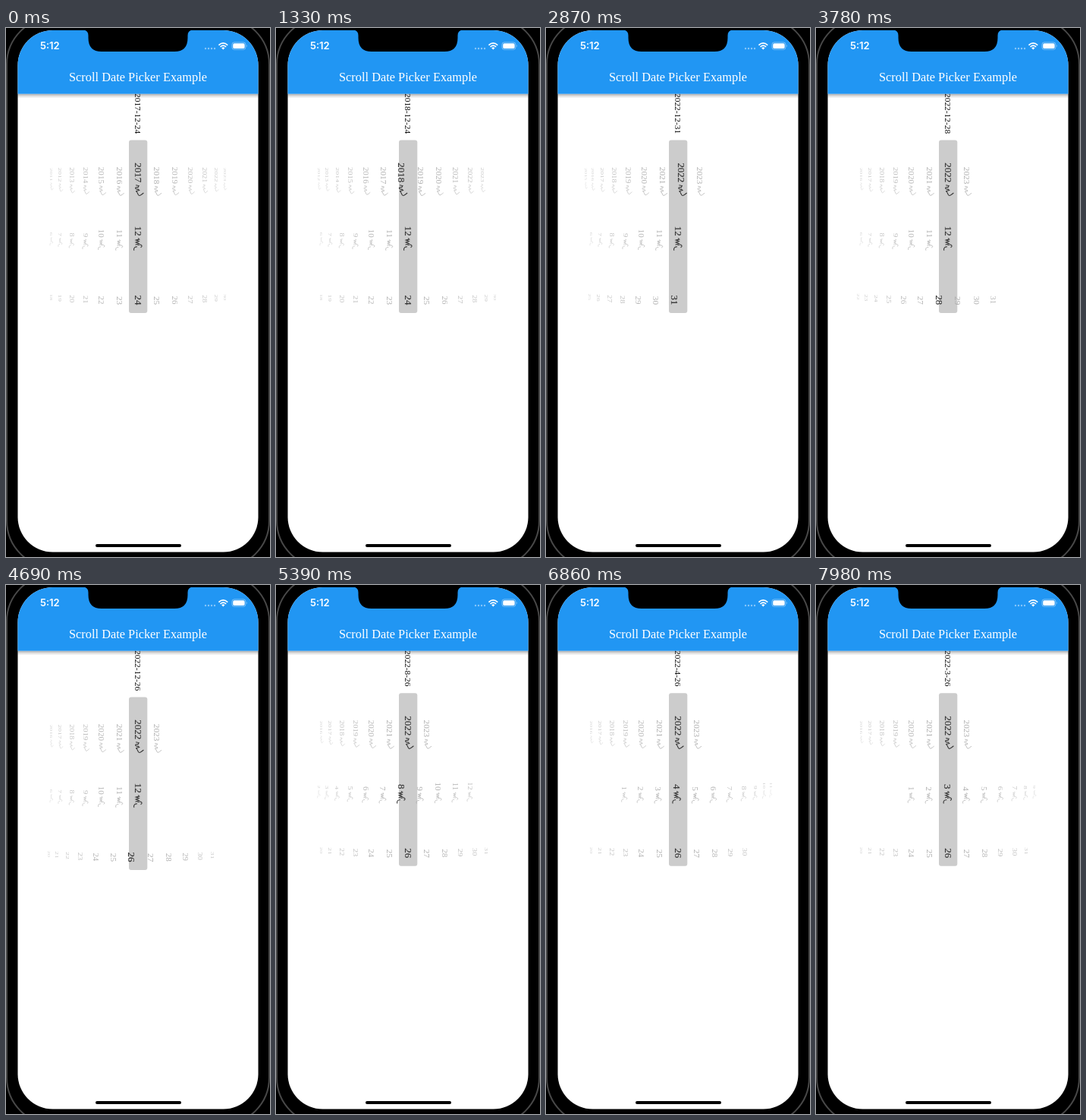
An HTML page for the animation above (8000 ms loop, 348x696 px).

```html
<!DOCTYPE html>
<html lang="en">
<head>
<meta charset="utf-8">
<title>Scroll Date Picker</title>
<style>
  html, body { margin: 0; width: 100%; height: 100%; overflow: hidden; background: #000; }
  svg { display: block; width: 348px; height: 696px; }
  .serif { font-family: "Liberation Serif", "Times New Roman", serif; }
</style>
</head>
<body>
<svg viewBox="0 0 348 696">
  <defs>
    <linearGradient id="shade" x2="0" y2="1">
      <stop offset="0" stop-color="#000" stop-opacity=".32"/>
      <stop offset=".5" stop-color="#000" stop-opacity=".12"/>
      <stop offset="1" stop-color="#000" stop-opacity="0"/>
    </linearGradient>
    <clipPath id="screen"><rect x="15.5" y="3" width="317" height="686.5" rx="46"/></clipPath>
  </defs>
  <rect width="348" height="696" fill="#000"/>
  <rect x="1" y="-14" width="346" height="724" rx="62" fill="none" stroke="#484848" stroke-width="2"/>
  <g clip-path="url(#screen)">
    <rect x="15" y="3" width="318" height="687" fill="#fff"/>
    <text id="date" class="serif" transform="translate(170.2 86)rotate(90)" font-size="11.4" fill="#111"/>
    <g id="picker" class="serif" font-size="11.4"></g>
    <rect x="15" y="86.700" width="318" height="6" fill="url(#shade)"/>
    <rect x="15" y="3" width="318" height="83.700" fill="#2196f3"/>
  </g>
  <path d="M102 2.500Q108.500 3 108.500 10V13Q108.500 31 126 31H222Q239.500 31 239.500 13V10Q239.500 3 246 2.500Z" fill="#000"/>
  <text class="serif" x="174" y="69.500" font-size="16.35" text-anchor="middle" fill="#fff">Scroll Date Picker Example</text>
  <text x="45" y="28.300" font-size="13" font-weight="600" fill="#fff" font-family="Inter, sans-serif">5:12</text>
  <g fill="#fff">
    <g opacity=".45">
      <circle cx="263" cy="27" r="1.200"/><circle cx="267" cy="27" r="1.200"/>
      <circle cx="271" cy="27" r="1.200"/><circle cx="275" cy="27" r="1.200"/>
    </g>
    <path d="M286.300 28.500L284.100 26.200Q286.300 24.400 288.500 26.200Z"/>
    <path d="M280.400 22.600Q286.300 17.200 292.200 22.600M282.500 24.800Q286.300 21.300 290.100 24.800" fill="none" stroke="#fff" stroke-width="1.700"/>
    <rect x="297.900" y="18.900" width="18" height="9.400" rx="2.900" fill="none" stroke="#fff" stroke-opacity=".45" stroke-width=".9"/>
    <rect x="299.200" y="20.200" width="15.400" height="6.800" rx="1.700"/>
    <path d="M317 22Q318.500 23.600 317 25.200Z" opacity=".5"/>
  </g>
  <rect x="118" y="679" width="113" height="4" rx="2" fill="#000"/>
</svg>
<script>
const LOOP = 8000, STEP = 70;
const CENTER = 174, EXTENT = 24.4, VIEW = 317;
const RADIUS = 1.5 * VIEW;
const ITEM_ANGLE = EXTENT / VIEW * 2 * Math.asin(1 / 3);
const DEPTH = 5.85;

// Mongolian words for "year" and "month", placed above the text end
const YEAR_WORD = 'M-2.500-12.500L1-11.800 0-10C-4-10.500-4-7.500 0-7.800L1.500-6.500-2.500-5.500C0-5-.5-.5 1.500-.4 3-.4 5-2.500 6.500-3.500';
const MONTH_WORD = 'M0-15L1.500-13.800-2.500-12.800 1-11.500-2.500-10.300 1-9-3-7.500M-.5-7C4-9 6-5.500 3-4.500M-1-5C-4-5.500-5.500-3-4.500-.8';

// keys: [ms, wheel position]
const columns = {
  year: { mid: 187, end: 221, gap: 15.5, word: YEAR_WORD, keys: [
    [1050, 2017], [1120, 2017.25], [1330, 2018.33], [1890, 2020.3], [2240, 2021.3],
    [2520, 2021.62], [2870, 2021.83], [3220, 2022]] },
  month: { mid: 263, end: 293.7, gap: 17.6, word: MONTH_WORD, keys: [
    [4900, 12], [5250, 9.3], [5670, 6.7], [6090, 4.8], [6370, 4.45], [6720, 4.13], [7140, 4],
    [7700, 4], [7770, 3.8], [7840, 3.5], [7910, 3.2], [7980, 3.02]] },
  day: { mid: 338, end: 364.4, gap: 0, word: '', keys: [
    [2310, 24], [2450, 25.6], [2730, 29.3], [2870, 31.2], [2940, 31.3], [3220, 31],
    [3570, 29.25], [4060, 27.6], [4410, 26.7], [4690, 26.33], [4970, 26]] }
};

// Monotone cubic interpolation
function sample(keys, t) {
  const last = keys.length - 1;
  if (t <= keys[0][0]) return keys[0][1];
  if (t >= keys[last][0]) return keys[last][1];
  const slope = i => (keys[i + 1][1] - keys[i][1]) / (keys[i + 1][0] - keys[i][0]);
  const tangent = i => {
    if (i === 0 || i === last) return 0;
    const a = slope(i - 1), b = slope(i);
    return a * b > 0 ? 2 * a * b / (a + b) : 0;
  };
  const i = keys.findIndex(k => k[0] > t) - 1;
  const [t0, v0] = keys[i], [t1, v1] = keys[i + 1];
  const h = t1 - t0, u = (t - t0) / h, r = 1 - u;
  return v0 * (1 + 2 * u) * r * r + h * tangent(i) * u * r * r
       + v1 * u * u * (3 - 2 * u) - h * tangent(i + 1) * u * u * r;
}

function item(col, value, k, selected, shift) {
  const angle = k * ITEM_ANGLE, sin = Math.sin(angle), cos = Math.cos(angle);
  const w = 1 + DEPTH * (1 - cos);
  const x = CENTER + RADIUS * sin / w;
  const y = col.mid + (col.end - col.mid) / w + shift;
  const zoom = selected ? 1.14 : 1;
  const sx = zoom * (cos / w - DEPTH * sin * sin / (w * w));
  const color = selected ? '#333' : '#a8a8a8';
  const fade = selected ? 1 : 1 - 0.08 * Math.abs(k);
  return `<g transform="matrix(${sx} 0 0 ${zoom / w} ${x} ${y})" fill="${color}" stroke="${color}" opacity="${fade}">
    <text transform="translate(-3.8 ${-col.gap})rotate(90)" text-anchor="end" stroke-width="${selected ? 0.12 : 0}">${value}</text>
    <path d="${col.word}" fill="none" stroke-width="${selected ? 0.95 : 0.8}"/></g>`;
}

function wheel(col, pos, picked, max, shift) {
  let out = '';
  for (let v = Math.max(1, Math.ceil(pos - 6.98)); v <= max && v - pos < 6.98; v++)
    out += item(col, v, v - pos, v === picked, shift);
  return out;
}

const picker = document.getElementById('picker');
const dateText = document.getElementById('date');

function draw(t) {
  const pos = {}, date = {};
  for (const name in columns) {
    pos[name] = sample(columns[name].keys, t);
    date[name] = Math.round(pos[name]);
  }
  const max = { year: 2023, month: 12, day: [4, 6, 9, 11].includes(date.month) ? 30 : 31 };
  const shift = date.month < 10 ? -5.2 : 0;
  dateText.textContent = `${date.year}-${date.month}-${date.day}`;
  picker.innerHTML = `<rect x="162" y="${147.5 + shift}" width="24.3" height="227.5" rx="3" fill="#ccc"/>`
    + Object.keys(columns).map(n => wheel(columns[n], pos[n], date[n], max[n], shift)).join('');
}

const start = performance.now();
let shown = -1;
function tick() {
  const step = Math.floor((performance.now() - start) % LOOP / STEP);
  if (step !== shown) draw((shown = step) * STEP);
  requestAnimationFrame(tick);
}
tick();
</script>
</body>
</html>
```
